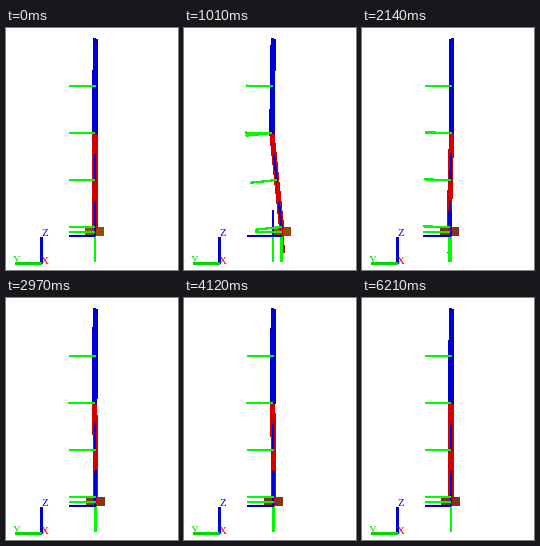
Write a matplotlib script that moves like this. It is 172 px wide and 242 px high and loops after 6.24 s.

```python
import numpy as np
import matplotlib.pyplot as plt
from matplotlib.animation import FuncAnimation
from matplotlib.patches import Rectangle

W, H, DPI = 172, 242, 100
LOOP, STEP = 6240, 20
PX = 72 / DPI
AXIS, LINK, FLOOR = 26, 94, 208
BLUE, RED, GREEN = "#0000d2", "#d20000", "#00f800"

# Turning points of the tip's swing: (ms, px)
SWING = [(160, 0), (235, .6), (540, -8), (840, 9),
         (2090, -1.8), (3200, 1.1), (5200, 0)]


def sway(t):
    """Ease from one turning point of the swing to the next."""
    x = SWING[0][1]
    for (t0, a), (t1, b) in zip(SWING, SWING[1:]):
        s = np.clip((t - t0) / (t1 - t0), 0, 1)
        x += (b - a) * s * s * (3 - 2 * s)
    return x


def unit(v):
    return v / np.hypot(*v)


fig = plt.figure(figsize=(W / DPI, H / DPI), dpi=DPI, facecolor="white")
ax = fig.add_axes([0, 0, 1, 1])
ax.set(xlim=(0, W), ylim=(H, 0))
ax.axis("off")


def line(color, width, z, a=(0, 0), b=(0, 0)):
    """Hard-edged line; every pixel it touches is filled."""
    return ax.plot([a[0], b[0]], [a[1], b[1]], color=color, lw=width * PX,
                   zorder=z, antialiased=False, snap=False,
                   solid_capstyle="butt")[0]


def place(item, a, b):
    item.set_data([a[0], b[0]], [a[1], b[1]])


# Corner triad
line(BLUE, 2.2, 5, (35.5, 236), (35.5, 209))
line("#00d800", 2.2, 5, (36, 235.5), (9, 235.5))
for name, color, x, y in [("Z", "#0000ff", 39, 208), ("X", "#ff0000", 39, 236),
                          ("Y", "#00e000", 11, 235)]:
    ax.text(x, y, name, color=color, family="Liberation Serif", size=11 * PX,
            ha="center", va="baseline", zorder=6)

# World frame
line(BLUE, 1.2, 6, (63, FLOOR), (89, FLOOR))
line(BLUE, 1.2, 4, (89, FLOOR), (89, FLOOR - AXIS))
line(GREEN, 1.2, 4, (89, FLOOR), (89, FLOOR + AXIS))

box = ax.add_patch(Rectangle((79, 199), 19, 9, lw=0, zorder=1, antialiased=False))
upper, lower = line(BLUE, 4.4, 3), line(RED, 4.2, 2)
tip_x = line(RED, 1.2, 3)
side = [line(GREEN, 1.2, 5) for _ in range(6)]
up = [line(BLUE, 1.2, 4) for _ in range(2)]
box_y, box_z = line(GREEN, 1.2, 4), line(BLUE, 1.2, 5)


def draw(n):
    t = n * STEP
    dx = sway(t)
    base = np.array([89.3, 11])
    elbow = np.array([89 - 1.2 * np.tanh(dx / 4), 11 + LINK])
    tip = np.array([89 + dx, 11 + 2 * LINK])
    u, v = unit(elbow - base), unit(tip - elbow)

    place(upper, base, elbow)
    place(lower, elbow, tip + 2 * v)
    place(tip_x, tip, tip + AXIS * v)

    mid1, mid2 = (base + elbow) / 2, (elbow + tip) / 2
    hub = np.array([tip[0], 204])
    frames = [(mid1, u), (elbow, u), (elbow, v), (mid2, v), (tip, v), (hub, (0, 1))]
    for item, (p, d) in zip(side, frames):
        place(item, p, p + AXIS * np.array([-d[1], d[0]]))
    for item, p in zip(up, (mid2, tip)):
        place(item, p, p - AXIS * v)

    foot = tip[0]
    place(box_y, (foot, FLOOR), (foot, FLOOR + AXIS))
    place(box_z, (foot, FLOOR), (foot - AXIS, FLOOR))
    box.set_x(79.4 + dx)
    box.set_facecolor("#964b00" if t < 1400 else "#84321a")
    return []


anim = FuncAnimation(fig, draw, frames=LOOP // STEP, interval=STEP,
                     repeat=True, repeat_delay=0, blit=False)
plt.show()
```
